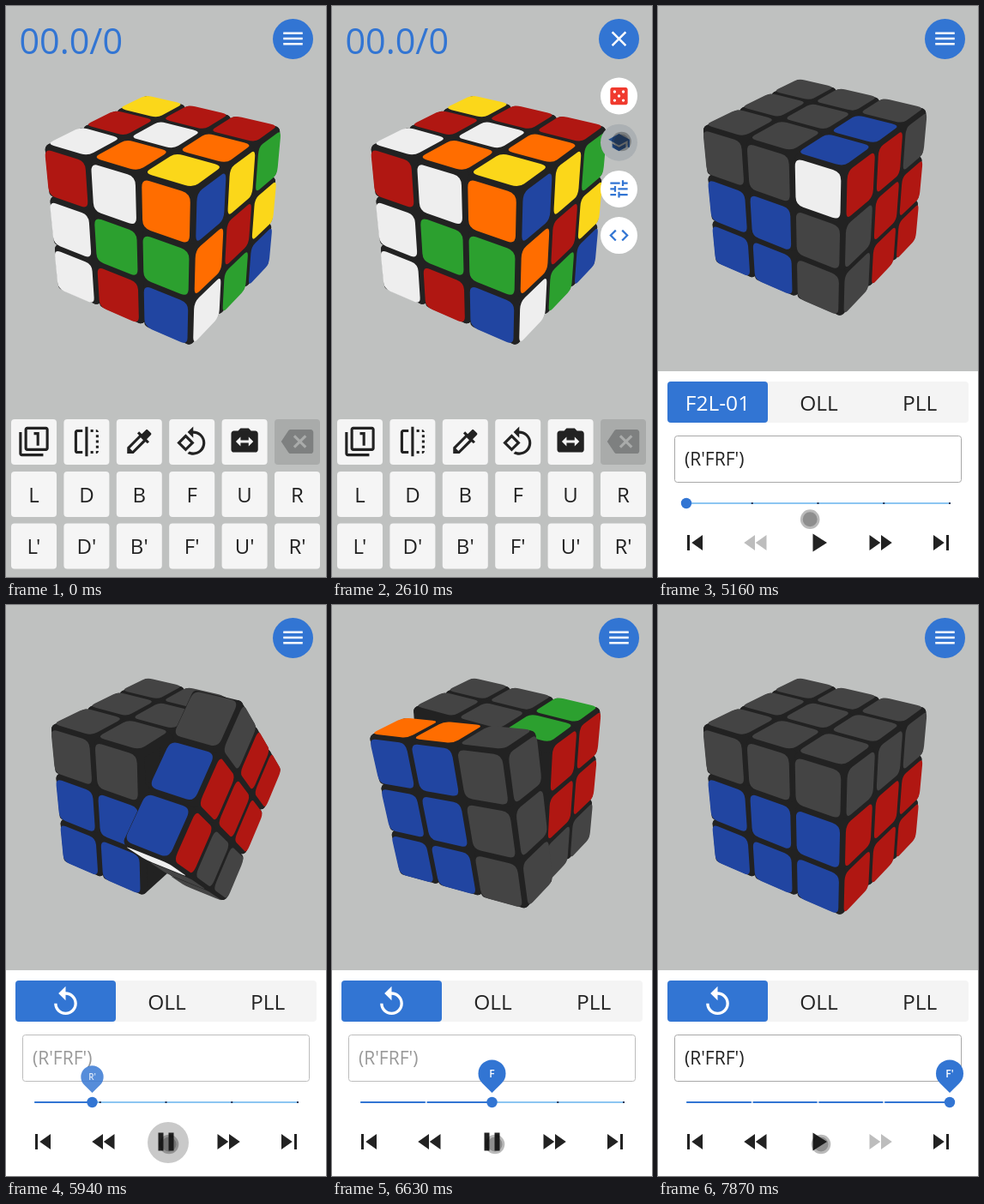
Recreate the animation shown at these times as an HTML page with a canvas. Size 373x666 px, loop 8 s.

```html
<!DOCTYPE html>
<html lang="en">
<head>
<meta charset="utf-8">
<title>Cube trainer</title>
<style>
html, body { margin: 0; width: 100%; height: 100%; overflow: hidden; background: #bfc1c0; }
canvas { display: block; width: 373px; height: 666px; }
</style>
</head>
<body>
<canvas id="stage"></canvas>
<script>
const LOOP = 8000, SOLVER_AT = 2990, PLAY_AT = 5686, TURN = 527;
const BLUE = '#3275d3', INK = '#222', FONT = '"Open Sans", "Noto Sans", sans-serif';
const COLORS = { R: '#b01712', O: '#ff6d00', Y: '#fbd71a', G: '#2ca02f', B: '#2145a1', W: '#eee', K: '#444' };

const canvas = document.getElementById('stage');
const ratio = window.devicePixelRatio || 1;
canvas.width = Math.round(373 * ratio);
canvas.height = Math.round(666 * ratio);
const ctx = canvas.getContext('2d');

const clamp = (v, lo = 0, hi = 1) => Math.min(hi, Math.max(lo, v));
const ramp = (t, start, length) => clamp((t - start) / length);
const ease = p => (1 - Math.cos(Math.PI * p)) / 2;
const dot = (a, b) => a[0] * b[0] + a[1] * b[1] + a[2] * b[2];

// Icons on a 24 unit grid
const dots = [[7.5, 7.5], [16.5, 7.5], [12, 12], [7.5, 16.5], [16.5, 16.5]]
  .map(([x, y]) => `M${x - 1.5} ${y}a1.5 1.5 0 1 0 3 0a1.5 1.5 0 1 0-3 0z`).join('');
const ICONS = {
  layers: 'M3 5H1v16c0 1.1.9 2 2 2h16v-2H3zm11 10h2V5h-4v2h2zm7-14H7c-1.1 0-2 .9-2 2v14c0 1.1.9 2 2 2h14c1.1 0 2-.9 2-2V3c0-1.1-.9-2-2-2zm0 16H7V3h14z',
  mirror: 'M15 21h2v-2h-2zm4-12h2V7h-2zM3 5v14c0 1.1.9 2 2 2h4v-2H5V5h4V3H5c-1.1 0-2 .9-2 2zm16-2v2h2c0-1.1-.9-2-2-2zm-8 20h2V1h-2zm8-6h2v-2h-2zM15 5h2V3h-2zm4 8h2v-2h-2zm0 8c1.1 0 2-.9 2-2h-2z',
  picker: 'M20.71 5.63l-2.34-2.34c-.39-.39-1.02-.39-1.41 0l-3.12 3.12-1.93-1.91-1.41 1.41 1.42 1.42L3 16.25V21h4.75l8.92-8.92 1.42 1.42 1.41-1.41-1.92-1.92 3.12-3.12c.4-.4.4-1.03.01-1.42zM6.92 19L5 17.08l8.06-8.06 1.92 1.92z',
  rotate: 'M7.34 6.41L.86 12.9l6.49 6.48 6.49-6.48zM3.69 12.9l3.66-3.66L11 12.9l-3.66 3.66zm15.67-6.26C17.61 4.88 15.3 4 13 4V.76L8.76 5 13 9.24V6c1.79 0 3.58.68 4.95 2.05 2.73 2.73 2.73 7.17 0 9.9C16.58 19.32 14.79 20 13 20c-.97 0-1.94-.21-2.84-.61l-1.49 1.49C10.02 21.62 11.51 22 13 22c2.3 0 4.61-.88 6.36-2.64 3.52-3.51 3.52-9.21 0-12.72z',
  camera: 'M20 4h-3.17L15 2H9L7.17 4H4c-1.1 0-2 .9-2 2v12c0 1.1.9 2 2 2h16c1.1 0 2-.9 2-2V6c0-1.1-.9-2-2-2zm-5 11.5V13H9v2.5L5.5 12 9 8.5V11h6V8.5l3.5 3.5z',
  erase: 'M22 3H7c-.69 0-1.23.35-1.59.88L0 12l5.41 8.11c.36.53.9.89 1.59.89h15c1.1 0 2-.9 2-2V5c0-1.1-.9-2-2-2zm-3 12.59L17.59 17 14 13.41 10.41 17 9 15.59 12.59 12 9 8.41 10.41 7 14 10.59 17.59 7 19 8.41 15.41 12z',
  menu: 'M3 18h18v-2H3zm0-5h18v-2H3zm0-7v2h18V6z',
  close: 'M19 6.41L17.59 5 12 10.59 6.41 5 5 6.41 10.59 12 5 17.59 6.41 19 12 13.41 17.59 19 19 17.59 13.41 12z',
  dice: 'M19 3H5c-1.1 0-2 .9-2 2v14c0 1.1.9 2 2 2h14c1.1 0 2-.9 2-2V5c0-1.1-.9-2-2-2z' + dots,
  school: 'M5 13.18v4L12 21l7-3.82v-4L12 17zM12 3L1 9l11 6 9-4.91V17h2V9z',
  tune: 'M3 17v2h6v-2zM3 5v2h10V5zm10 16v-2h8v-2h-8v-2h-2v6zM7 9v2H3v2h4v2h2V9zm14 4v-2H11v2zm-6-4h2V7h4V5h-4V3h-2z',
  code: 'M9.4 16.6L4.8 12l4.6-4.6L8 6l-6 6 6 6zm5.2 0l4.6-4.6-4.6-4.6L16 6l6 6-6 6z',
  first: 'M6 6h2v12H6zm3.5 6l8.5 6V6z',
  rewind: 'M11 18V6l-8.5 6zm.5-6l8.5 6V6z',
  play: 'M8 5v14l11-7z',
  pause: 'M6 19h4V5H6zm8-14v14h4V5z',
  forward: 'M4 18l8.5-6L4 6zm9-12v12l8.5-6z',
  last: 'M6 18l8.5-6L6 6zM16 6v12h2V6z',
  replay: 'M12 5V1L7 6l5 5V7c3.31 0 6 2.69 6 6s-2.69 6-6 6-6-2.69-6-6H4c0 4.42 3.58 8 8 8s8-3.58 8-8-3.58-8-8-8z'
};
for (const name in ICONS) ICONS[name] = new Path2D(ICONS[name]);

function icon(name, x, y, size, color, alpha = 1, turn = 0) {
  ctx.save();
  ctx.translate(x, y);
  ctx.rotate(turn);
  ctx.scale(size / 24, size / 24);
  ctx.translate(-12, -12);
  ctx.globalAlpha = alpha;
  ctx.fillStyle = color;
  ctx.fill(ICONS[name], 'evenodd');
  ctx.restore();
}

function disc(x, y, r, color) {
  ctx.fillStyle = color;
  ctx.beginPath();
  ctx.arc(x, y, Math.max(0, r), 0, 7);
  ctx.fill();
}

function box(x, y, w, h, radius, color) {
  ctx.fillStyle = color;
  ctx.beginPath();
  ctx.roundRect(x, y, w, h, radius);
  ctx.fill();
}

function text(string, x, y, size, color, align = 'center', weight = 400) {
  ctx.font = `${weight} ${size}px ${FONT}`;
  ctx.textAlign = align;
  ctx.fillStyle = color;
  ctx.fillText(string, x, y);
}

// Camera: one unit is one cubie, axes are x = right, y = up, z = front
const AZIMUTH = 33.7 * Math.PI / 180, ELEVATION = 29.4 * Math.PI / 180, DISTANCE = 12.3;
const sa = Math.sin(AZIMUTH), ca = Math.cos(AZIMUTH), se = Math.sin(ELEVATION), ce = Math.cos(ELEVATION);
const RIGHT = [ca, 0, -sa], UP = [-sa * se, ce, -ca * se], TOWARD = [sa * ce, se, ca * ce];
const EYE = TOWARD.map(v => v * DISTANCE);

function rotated(v, axis, angle) {
  const i = (axis + 1) % 3, j = (axis + 2) % 3, c = Math.cos(angle), s = Math.sin(angle), out = [...v];
  out[i] = c * v[i] - s * v[j];
  out[j] = s * v[i] + c * v[j];
  return out;
}

// All turned layers are the outer positive ones
const MOVES = { "R'": [0, 1], R: [0, -1], F: [2, -1], "F'": [2, 1] };
const SETUP = ['F', "R'", "F'", 'R'];
const SOLUTION = ["R'", 'F', 'R', "F'"];

function turn(cubies, name, part = 1) {
  const [axis, sign] = MOVES[name], angle = sign * part * Math.PI / 2;
  for (const c of cubies) {
    if (c.pos[axis] < 0.5) continue;
    c.pos = rotated(c.pos, axis, angle);
    c.basis = c.basis.map(v => rotated(v, axis, angle));
  }
  return axis;
}

function newCube(colorOf) {
  const cubies = [], steps = [-1, 0, 1];
  for (const x of steps) for (const y of steps) for (const z of steps) {
    cubies.push({ home: [x, y, z], pos: [x, y, z], basis: [[1, 0, 0], [0, 1, 0], [0, 0, 1]], colorOf });
  }
  return cubies;
}

const SCRAMBLE = { 0: 'BYGORYWGB', 1: 'YRRRWOWOY', 2: 'RWOWGGWRB' };
function scrambledColor([x, y, z], axis, side) {
  if (side < 0) return 'O';
  const cell = [(1 - y) * 3 + 1 - z, (z + 1) * 3 + x + 1, (1 - y) * 3 + x + 1][axis];
  return SCRAMBLE[axis][cell];
}
const trainerColor = ([, y], axis, side) => y > 0 ? 'K' : ['OR', 'WK', 'GB'][axis][side > 0 ? 1 : 0];

function drawCube(cubies, axis, focal, cy) {
  const project = p => {
    const k = focal / (DISTANCE - dot(p, TOWARD));
    return [186.4 + k * dot(p, RIGHT), cy - k * dot(p, UP)];
  };
  const far = c => Math.hypot(...c.pos.map((v, i) => v - EYE[i]));
  cubies.sort((a, b) => Math.round(a.pos[axis]) - Math.round(b.pos[axis]) || far(b) - far(a));
  ctx.lineJoin = 'round';
  for (const c of cubies) {
    const at = (face, side, depth, u, v) => {
      const local = [0, 0, 0];
      local[face] = side * depth;
      local[(face + 1) % 3] = u;
      local[(face + 2) % 3] = v;
      return project(c.pos.map((p, i) => p + c.basis.reduce((sum, b, k) => sum + b[i] * local[k], 0)));
    };
    const visible = [];
    for (let face = 0; face < 3; face++) for (const side of [-1, 1]) {
      const normal = c.basis[face].map(v => v * side);
      if (dot(normal, EYE.map((e, i) => e - c.pos[i] - normal[i] / 2)) > 0) visible.push([face, side]);
    }
    // Rounded body: an inset cube with a thick round outline
    ctx.fillStyle = ctx.strokeStyle = INK;
    ctx.lineWidth = 0.2 * focal / (DISTANCE - dot(c.pos, TOWARD));
    for (const [face, side] of visible) {
      ctx.beginPath();
      for (const [u, v] of [[1, 1], [-1, 1], [-1, -1], [1, -1]]) ctx.lineTo(...at(face, side, 0.4, u * 0.4, v * 0.4));
      ctx.closePath();
      ctx.fill();
      ctx.stroke();
    }
    for (const [face, side] of visible) {
      if (c.home[face] !== side) continue;
      const h = 0.44, q = 0.29;
      ctx.beginPath();
      for (const [u, v] of [[1, 1], [-1, 1], [-1, -1], [1, -1]]) {
        const a = at(face, side, 0.51, u * h, v * q), b = at(face, side, 0.51, u * q, v * h);
        const [from, to] = u * v > 0 ? [a, b] : [b, a];
        ctx.lineTo(...from);
        ctx.quadraticCurveTo(...at(face, side, 0.51, u * h, v * h), ...to);
      }
      ctx.closePath();
      ctx.fillStyle = COLORS[c.colorOf(c.home, face, side)];
      ctx.fill();
    }
  }
}

function drawKeypad() {
  const icons = ['layers', 'mirror', 'picker', 'rotate', 'camera', 'erase'];
  [...'LDBFUR'].forEach((letter, i) => {
    const x = 6 + i * 61.4, mid = x + 26.5, disabled = i === 5;
    box(x, 482, 53, 53, 4, disabled ? '#a9abaa' : '#f5f5f5');
    icon(icons[i], mid, 508, 37.5, disabled ? '#7e8080' : INK);
    [543, 603.5].forEach((y, row) => {
      box(x, y, 53, 53, 4, '#f5f5f5');
      text(letter + (row ? "'" : ''), mid, Math.floor(y) + 36, 24, INK);
    });
  });
}

function drawMenu(t) {
  const open = t < SOLVER_AT ? ramp(t, 1210, 220) : 0;
  disc(334.5, 38.5, 23.5, BLUE);
  icon('menu', 334.5, 38, 30, '#fff', 1 - open, open * Math.PI / 4);
  icon('close', 334.5, 38.3, 30, '#fff', open, (open - 1) * Math.PI / 4);
  if (!open) return;
  ['dice', 'school', 'tune', 'code'].forEach((name, i) => {
    const p = ease(ramp(t, 1220 + i * 40, 220)), y = 105 + i * 54.2, hover = i === 1 && t >= 2460;
    if (!p) return;
    ctx.globalAlpha = p;
    disc(334.5, y, 21.5 * p, hover ? '#abb0b3' : '#fff');
    ctx.globalAlpha = 1;
    icon(name, 334.5, y, 27 * p, i === 0 ? '#f03a2e' : hover ? '#27528f' : BLUE, p);
  });
}

function drawPlayer(t, step, position) {
  const started = t >= PLAY_AT - 50, ended = step >= 4, playing = started && !ended;
  ctx.fillStyle = '#fff';
  ctx.fillRect(0, 426, 373, 240);
  box(11, 438, 351, 48, 4, '#f4f4f4');
  box(11, 438, 117, 48, 4, BLUE);
  if (started) icon('replay', 69.5, 463, 40, '#fff');
  else text('F2L-01', 69.5, 472, 24.5, '#fff');
  text('OLL', 187.5, 472, 24.5, INK);
  text('PLL', 305, 472, 24.5, INK);

  ctx.strokeStyle = playing ? '#bdbdbd' : '#a8a8a8';
  ctx.lineWidth = 1;
  ctx.beginPath();
  ctx.roundRect(19.5, 501.5, 334, 54, 3);
  ctx.stroke();
  text("(R'FRF')", 31, 535.5, 21, playing ? '#999' : INK, 'left');

  const thumb = 33 + position * 76.75;
  box(33, 579, 307, 2, 1, '#8cc6f2');
  box(33, 579, thumb - 33, 2, 1, BLUE);
  for (let i = 1; i <= 4; i++) {
    ctx.fillStyle = i < position && i < 4 ? '#dfe9f8' : '#235';
    ctx.fillRect(32 + i * 76.75, 579, 2, 2);
  }
  disc(thumb, 580, 6.2, BLUE);
  if (position > 0) drawPin(thumb, SOLUTION[Math.min(step, 3)], ramp(t, PLAY_AT, 310));

  const ripple = ramp(t, 5600, 300), fade = 1 - ramp(t, 5960, 280);
  if (ripple && fade) disc(189, 627, 24 * ripple, `rgba(0,0,0,${0.21 * fade})`);
  icon('first', 43, 626, 36, INK);
  icon('rewind', 114.5, 626, 36, started ? INK : '#bdbdbd');
  icon(playing ? 'pause' : 'play', 186.5, 626, 36, INK);
  icon('forward', 258.5, 626, 36, ended ? '#bdbdbd' : INK);
  icon('last', 330, 626, 36, INK);
}

function drawPin(x, label, scale) {
  ctx.save();
  ctx.translate(x, 569);
  ctx.scale(scale, scale);
  ctx.globalAlpha = scale;
  ctx.fillStyle = BLUE;
  ctx.beginPath();
  ctx.arc(0, -22.6, 16, Math.PI * 0.75, Math.PI * 0.25);
  ctx.lineTo(0, 0);
  ctx.fill();
  text(label, 0, -18.3, 12, '#fff', 'center', 600);
  ctx.restore();
}

const POINTER = [
  [140, 279, 529], [500, 300, 300], [910, 338, 37], [990, 338, 42], [1650, 338, 42],
  [1910, 337.5, 112], [2210, 337.5, 158], [4160, 337.5, 158], [4230, 323, 188], [4460, 171, 500],
  [4690, 168, 512], [5000, 165, 565], [5330, 190, 634], [5460, 190, 629], [LOOP, 190, 629]
];

function drawPointer(t) {
  const next = POINTER.findIndex(key => key[0] > t);
  if (next < 1) return;
  const a = POINTER[next - 1], b = POINTER[next], p = ramp(t, a[0], b[0] - a[0]);
  const x = a[1] + (b[1] - a[1]) * p, y = a[2] + (b[2] - a[2]) * p;
  disc(x, y, 11.3, 'rgba(0,0,0,.27)');
  disc(x, y, 8.5, 'rgba(40,40,40,.3)');
}

function draw(t) {
  ctx.setTransform(ratio, 0, 0, ratio, 0, 0);
  ctx.fillStyle = '#bfc1c0';
  ctx.fillRect(0, 0, 373, 666);
  if (t < SOLVER_AT) {
    text('00.0/0', 15.5, 56, 41.3, BLUE, 'left');
    drawCube(newCube(scrambledColor), 0, 778, 238.3);
    drawKeypad();
  } else {
    const elapsed = t - PLAY_AT, step = clamp(Math.floor(elapsed / TURN), -1, 4);
    const local = elapsed - step * TURN;
    const position = step < 0 ? 0 : Math.min(4, step + clamp(local / 290));
    const cube = newCube(trainerColor);
    let axis = 0;
    SETUP.forEach(name => turn(cube, name));
    SOLUTION.slice(0, Math.max(0, step)).forEach(name => turn(cube, name));
    if (step >= 0 && step < 4) axis = turn(cube, SOLUTION[step], ease(local / TURN));
    drawCube(cube, axis, 738, 212.3);
    drawPlayer(t, step, position);
  }
  drawMenu(t);
  drawPointer(t);
}

const begin = performance.now();
function tick() {
  draw((performance.now() - begin) % LOOP);
  requestAnimationFrame(tick);
}
tick();
</script>
</body>
</html>
```
